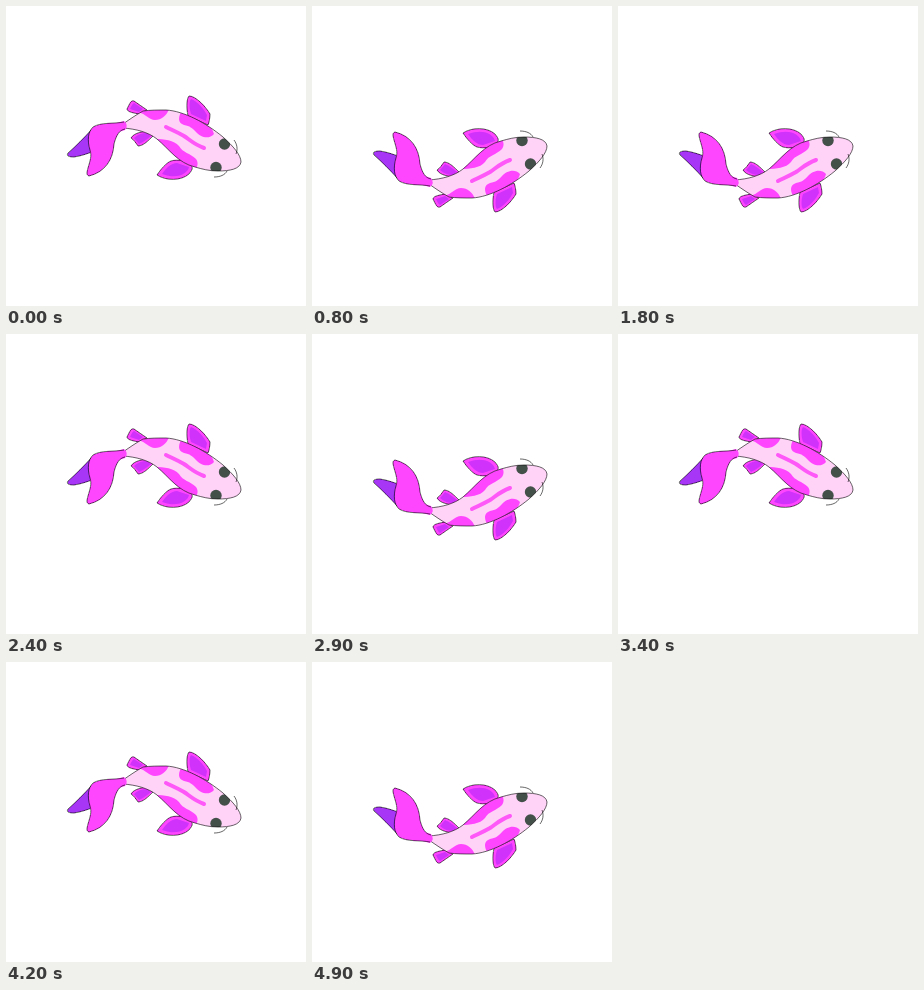
An HTML page that plays this animation: 300x300 px, repeating every 5000 ms.

```html
<!DOCTYPE html>
<html lang="en">
<head>
<meta charset="utf-8">
<title>Swimming koi</title>
<style>
  html, body { margin: 0; width: 100%; height: 100%; overflow: hidden; background: #fff; }
  svg { display: block; width: 100vw; height: 100vh; }

  .down { animation: first 1s step-end infinite; }
  .up   { animation: second 1s step-end infinite; }
  @keyframes first  { 0% { visibility: visible; } 50%, 100% { visibility: hidden; } }
  @keyframes second { 0% { visibility: hidden; } 50%, 100% { visibility: visible; } }

  .line { stroke: #000; stroke-width: .6; stroke-linejoin: round; shape-rendering: crispEdges; }
  .pink { fill: #ff46ff; }
  .pale { fill: #ffd2f8; }
  .eye  { fill: #435049; }
  .tail { fill: #a836f6; }
  .fin  { fill: #d032fc; }
  .bare { fill: none; }
  .stripe { fill: none; stroke: #ff58f8; stroke-width: 4; stroke-linecap: round; }
</style>
</head>
<body>
<svg viewBox="0 0 300 300">
  <defs>
    <path id="body" d="M117 118C124 113 130 109 137 105C144 104 152 104 160 104C178 105 200 117 217 131C227 140 235 149 235 156C234 163 224 165 212 165C203 165 196 163 189 161C172 157 163 143 151 133C142 126 130 123 117 122Z"/>
    <clipPath id="skin"><use href="#body"/></clipPath>

    <g id="koi">
      <!-- Small rear fins -->
      <path class="pink line" d="M141 104L128 95C125 94 124 97 121 103C121 106 128 107 133 108Z"/>
      <path class="fin" d="M137 103L128 97Q126 98 124 103L133 106Z"/>
      <path class="pink line" d="M125 132C128 127 135 126 141 125L147 130C142 135 137 140 132 140C130 137 128 134 125 132Z"/>
      <path class="fin" d="M128 132Q133 127 141 127L145 130Q138 136 133 138Z"/>

      <!-- Large front fins -->
      <path class="pink line" d="M182 110C180 100 181 92 183 90C190 90 200 101 204 108C204 112 203 117 202 119Z"/>
      <path class="fin" d="M185 108C183 102 183 95 185 93C191 95 198 103 201 109L200 115Z"/>
      <path class="pink line" d="M151 169C155 163 160 157 165 155C172 153 180 155 184 158C188 162 186 164 183 168C175 175 160 175 151 169Z"/>
      <path class="fin" d="M156 168C160 162 165 157 171 157L183 161C182 167 172 174 156 168Z"/>

      <!-- Body with markings -->
      <use href="#body" class="pale"/>
      <g clip-path="url(#skin)">
        <path class="pink" d="M132 106C142 101 155 102 163 103C161 109 156 114 149 114C143 114 140 108 132 106Z"/>
        <path class="pink" d="M175 106C172 112 172 117 178 119C184 120 186 122 190 126C194 131 203 134 208 128C206 118 190 108 175 106Z"/>
        <path class="pink" d="M149 133C158 133 168 134 173 140C177 147 184 147 190 153C193 157 191 161 190 163C172 162 161 146 149 133Z"/>
        <circle class="eye" cx="218.5" cy="138" r="5.7"/>
        <circle class="eye" cx="210" cy="161.5" r="5.7"/>
      </g>
      <path class="stripe" d="M160 121C166 124 171 126 178 130C184 134 189 139 198 142"/>
      <use href="#body" class="bare line"/>

      <!-- Tail -->
      <path class="tail line" d="M86 123C78 132 70 140 62 147C60 150 63 151 68 151C75 150 80 148 86 146Z"/>
      <path class="pink" d="M118 115Q123 119 119 124L110 127V117Z"/>
      <path class="pink line" d="M119 123C113 124 110 130 108 138C107 154 99 166 83 170C80 169 81 166 82 162C84 155 86 150 84 144C81 134 82 126 87 121C95 116 108 118 118 116"/>

      <!-- Whiskers -->
      <path class="bare line" d="M228 134C231 138 232 143 230 148M208 171C214 171 219 169 221 165"/>
    </g>
  </defs>

  <use href="#koi" class="down"/>
  <use href="#koi" class="up" transform="matrix(1 0 0 -1 0 296)"/>
</svg>
</body>
</html>
```
